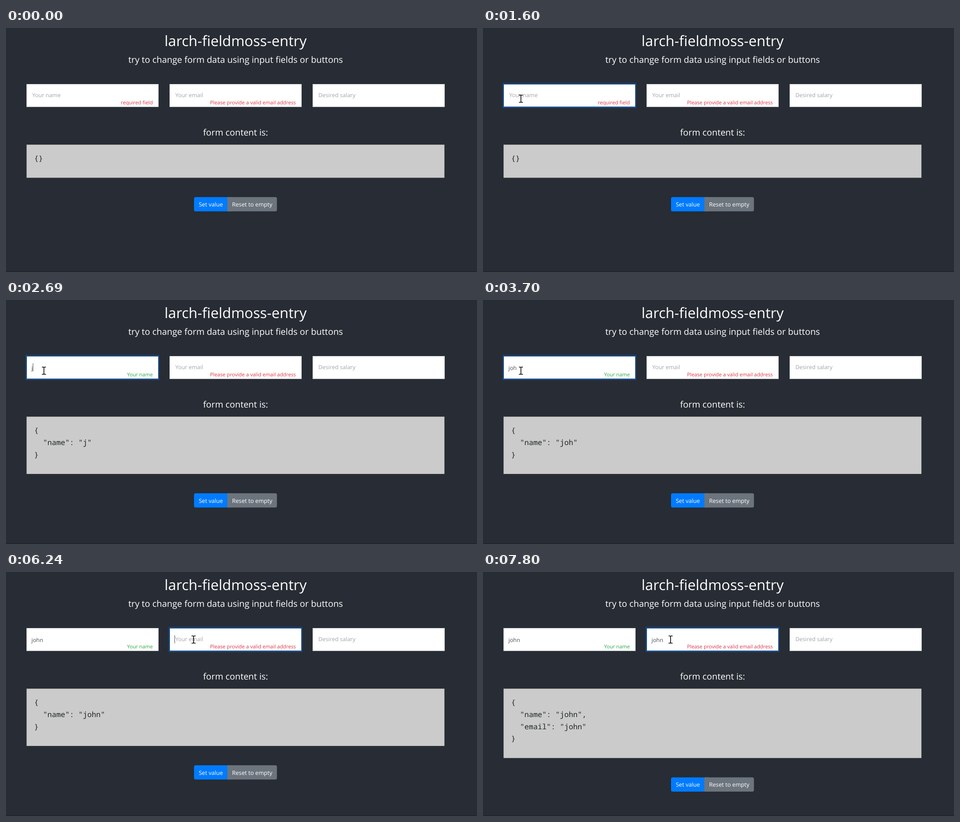
An HTML page for the animation above (8000 ms loop, 1037 by 540 pixels).

```html
<!DOCTYPE html>
<html lang="en">
<head>
<meta charset="utf-8">
<title>Form demo</title>
<style>
  html, body { margin: 0; width: 100%; height: 100%; overflow: hidden; background: #282c34; }
  svg { display: block; width: 1037px; height: 540px; }
  text { font: 12.4px "Open Sans", "Noto Sans", sans-serif; fill: #fff; white-space: pre; text-rendering: geometricPrecision; }
  .mid { text-anchor: middle; }
  .hint { font-size: 11.25px; text-anchor: end; }
  .title { font-size: 31.7px; }
  .sub { font-size: 19.4px; }
  .btn { font-size: 12.65px; }
  .bad { fill: #dc3545; }
  .good { fill: #28a745; }
  .placeholder { fill: #a0a4a8; }
  .typed { fill: #495057; }
  .code { font: 16.25px "Noto Sans Mono", "DejaVu Sans Mono", monospace; fill: #212529; }
</style>
</head>
<body>
<svg viewBox="0 0 1037 540">
  <rect width="1037" height="540" fill="#282c34"/>
  <rect y="538" width="1037" height="2" fill="#22252c"/>
  <text class="mid title" x="505.5" y="40">larch-fieldmoss-entry</text>
  <text class="mid sub" x="505.5" y="77">try to change form data using input fields or buttons</text>
  <g id="fields"></g>
  <text class="hint bad" id="required" x="323.3" y="169">required field</text>
  <text class="hint good" id="label" x="323.3" y="169">Your name</text>
  <text class="hint bad" x="638.2" y="169">Please provide a valid email address</text>
  <text class="mid sub" x="505.5" y="238">form content is:</text>
  <rect id="panel" x="45.3" y="258.2" width="920" fill="#cacbca"/>
  <g id="code"></g>
  <g id="buttons">
    <rect x="414" width="80" height="31.3" rx="3.5" fill="#007bff"/>
    <rect x="487.5" width="109" height="31.3" rx="3.5" fill="#6c757d"/>
    <rect x="487.5" width="9" height="31.3" fill="#6c757d"/>
    <text class="mid btn" x="451" y="20.8">Set value</text>
    <text class="mid btn" x="542" y="20.8">Reset to empty</text>
  </g>
  <rect id="caret" y="140" width="1" height="18" fill="#495057"/>
  <path id="arrow" d="M0 0V15.5L3.6 12.1L6 17.8L8.3 16.8L5.9 11.3H11Z" fill="#fff" stroke="#000" stroke-width=".9"/>
  <path id="beam" d="M-4.5-8H-1.2L0-7.2L1.2-8H4.5M-4.5 8H-1.2L0 7.2L1.2 8H4.5M0-7.2V7.2" fill="none" stroke="#000" stroke-width="1.6"/>
</svg>
<script>
const LOOP = 8000;
const WORD = "john";
const $ = id => document.getElementById(id);

function add(parent, tag, attrs, content = "") {
  const el = document.createElementNS("http://www.w3.org/2000/svg", tag);
  for (const key in attrs) el.setAttribute(key, attrs[key]);
  el.textContent = content;
  return parent.appendChild(el);
}
const set = (el, key, value) => el.setAttribute(key, value);
const show = (el, on) => set(el, "visibility", on ? "visible" : "hidden");
const lerp = (a, b, p) => a + (b - a) * p;

const fields = [
  { key: "name", x: 45, hint: "Your name", keys: [2150, 3300, 3700, 3940] },
  { key: "email", x: 360, hint: "Your email", keys: [6410, 6790, 7340, 7570] },
  { x: 675, hint: "Desired salary", keys: [] }
];
for (const f of fields) {
  const g = $("fields");
  f.ring = add(g, "rect", { x: f.x - 2.2, y: 121.4, width: 295, height: 55.8, rx: 1, fill: "#1c4373" });
  f.box = add(g, "rect", { x: f.x + .5, y: 124.5, width: 290, height: 49.8, fill: "#fff" });
  f.edge = add(g, "rect", { x: f.x + .5, y: 124.5, width: 290, height: 49.8, fill: "none", stroke: "#17559a" });
  set(f.box, "stroke", "#ced4da");
  f.placeholder = add(g, "text", { class: "placeholder", x: f.x + 12.7, y: 153 }, f.hint);
  f.typed = add(g, "text", { class: "typed", x: f.x + 11, y: 154.6 });
}
const lines = [0, 1, 2, 3].map(i => add($("code"), "text", { class: "code", x: 62, y: 294.2 + i * 26.75 }));

// Caret: visible spans and its offset after each typed letter
const caretSpans = [[2690, 3160], [3300, 3700], [3940, 4250], [4780, 5270],
  [5340, 5720], [6240, 6410], [6880, 7800]];
const caretOffset = [11, 14, 22, 30, 37];

function focusLevel(i, t) {
  if (i === 0) return t < 1600 || t >= 5340 ? 0 : t < 5270 ? 1 : .5;
  return i === 1 && t >= 5340 ? 1 : 0;
}

// The pointer jumps in even steps along each stretch
function pointer(t) {
  const step = (start, size, count) => Math.min(1, Math.floor((t - start) / size) / count);
  if (t < 70 || t >= 440 && t < 600) return null;
  if (t < 440) {
    const p = step(70, 74, 4);
    return [lerp(735, 91, p), lerp(463, 213, p)];
  }
  if (t < 1130) {
    const p = step(600, 78, 5);
    return [lerp(13, 75, p), lerp(169, 156.5, p)];
  }
  if (t < 4480) return [83.5, 156.5];
  const p = step(4480 - 76, 76, 9);
  const ease = p * p * (3 - 2 * p);
  return [lerp(83.5, t < 5200 ? 412 : 413, ease), lerp(156.5, 149.5, ease)];
}

function draw(t) {
  const data = {};
  fields.forEach((f, i) => {
    f.count = f.keys.filter(k => k <= t).length;
    const text = WORD.slice(0, f.count);
    if (text) data[f.key] = text;
    f.typed.textContent = text;
    show(f.placeholder, !text);
    set(f.ring, "opacity", focusLevel(i, t));
    set(f.edge, "opacity", focusLevel(i, t));
  });

  const named = fields[0].count > 0;
  show($("required"), !named);
  show($("label"), named);
  const fade = Math.floor((t - 2150) / 80) / 4;
  set($("label"), "opacity", Math.min(1, Math.max(.04, fade)));

  const json = JSON.stringify(data, null, 2).split("\n");
  lines.forEach((line, i) => line.textContent = json[i] || "");
  const height = 46.5 + 26.75 * json.length;
  set($("panel"), "height", height);
  set($("buttons"), "transform", `translate(0 ${258.2 + height + 42.9})`);

  const active = fields[t < 5340 ? 0 : 1];
  set($("caret"), "x", active.x + caretOffset[active.count]);
  show($("caret"), caretSpans.some(([from, to]) => t >= from && t < to));

  const pos = pointer(t);
  const overField = pos && pos[1] > 124 && pos[1] < 175 &&
    fields.some(f => pos[0] > f.x && pos[0] < f.x + 291);
  show($("arrow"), pos && !overField);
  show($("beam"), overField);
  if (pos) for (const id of ["arrow", "beam"]) set($(id), "transform", `translate(${pos})`);
}

const begin = performance.now();
function tick() {
  draw((performance.now() - begin) % LOOP);
  requestAnimationFrame(tick);
}
tick();
</script>
</body>
</html>
```
